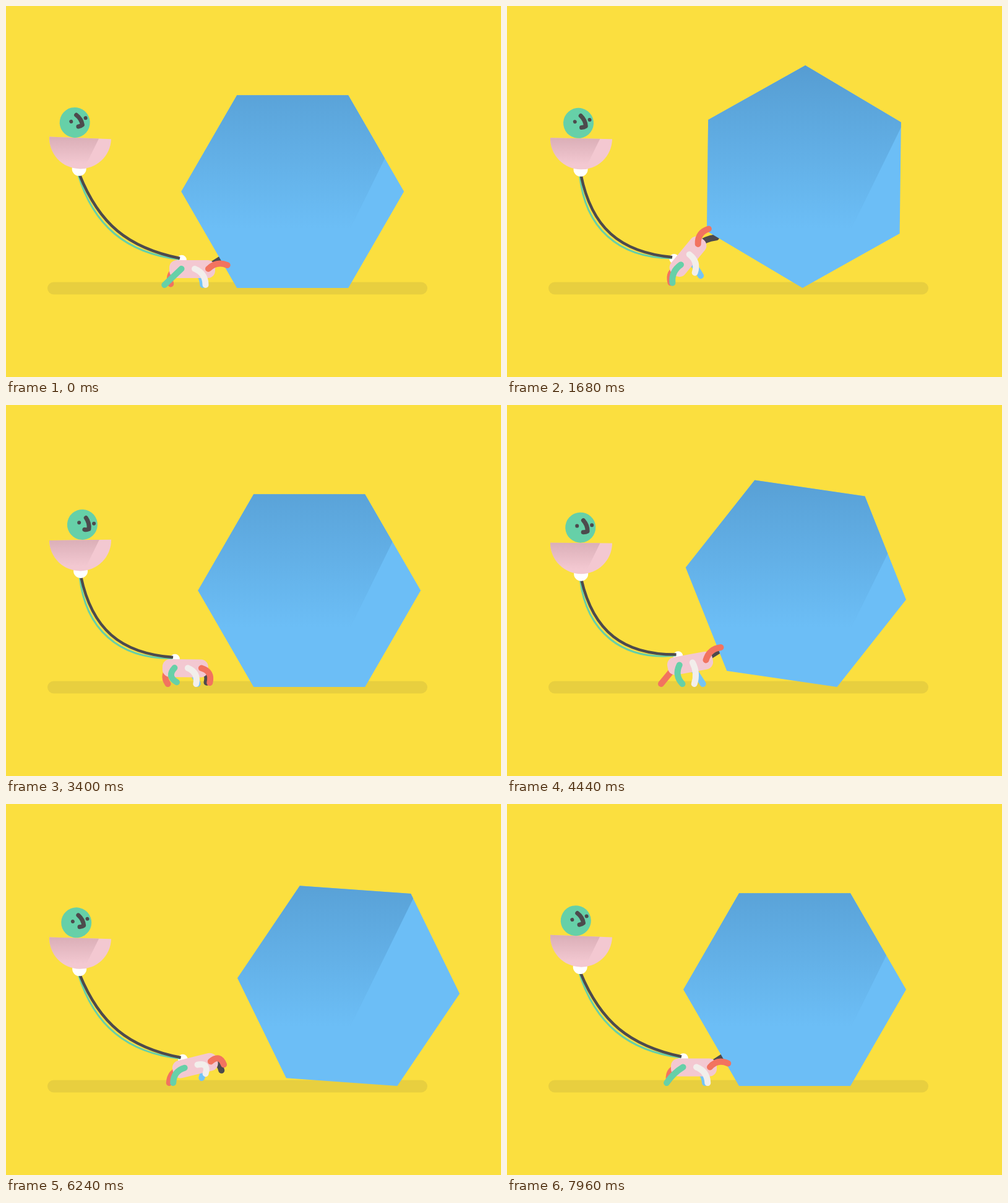
These frames come from a looping animation (800 px wide and 600 px high, 8 s). An HTML page with a canvas:

```html
<!DOCTYPE html>
<html lang="en">
<head>
<meta charset="utf-8">
<title>Rolling hexagon</title>
<style>
  html, body { margin: 0; width: 100%; height: 100%; overflow: hidden; background: #fbdf3f; }
  canvas { display: block; }
</style>
</head>
<body>
<canvas id="stage" width="800" height="600"></canvas>
<script>
const ctx = document.getElementById('stage').getContext('2d');
const CYCLE = 4000, LOOP = 8000, STEP = 40;
const SIDE = 180, GROUND = 456, SOLE = 451;
const DRIFT = SIDE / CYCLE;               // the floor slides one side length per roll
const SHOVE = 14.45, RELEASE = 1600, LAND = 2130;
const SWING = 240, LIMB = 37.6;
const RAD = Math.PI / 180;
const C = {
  bg: '#fbdf3f', floor: '#e8cf3f', hex: '#6cbef6', pink: '#f3c8d1', green: '#66d0a8',
  dark: '#4d4a4d', coral: '#f2735f', white: '#f2eeeb', blue: '#74c4f5'
};

const mix = (a, b, u) => a + (b - a) * u;
const smooth = u => {
  u = Math.min(1, Math.max(0, u));
  return u * u * (3 - 2 * u);
};

function turn(x, y, deg) {
  const c = Math.cos(deg * RAD), s = Math.sin(deg * RAD);
  return [x * c - y * s, x * s + y * c];
}

// Two shoves, a fall, then ever smaller rocking from edge to edge.
function roll(t) {
  if (t < RELEASE) return SHOVE * (smooth(t / 800) + smooth((t - 920) / 680));
  if (t < LAND) return mix(2 * SHOVE, 60, ((t - RELEASE) / (LAND - RELEASE)) ** 1.5);
  let s = t - LAND, span = 480, height = 5.7;
  while (s > span && span > 20) {
    s -= span;
    span *= 0.48;
    height *= -0.42;
  }
  const u = Math.min(1, s / span);
  return 60 + height * 4 * u * (1 - u);
}

function hexPose(t) {
  const angle = roll(t), n = Math.floor(angle / 60), tilt = angle - 60 * n;
  const [dx, dy] = turn(-SIDE / 2, -SIDE * Math.sqrt(3) / 2, tilt);
  return { x: 553.2 + SIDE * n - DRIFT * t + dx, y: GROUND + dy, tilt };
}

// Key poses of the torso: time, x, y, tilt.
const POSES = [
  [0, 301, 425.5, 0], [440, 296, 417.7, -10.5], [920, 283.5, 414, -20], [1600, 291, 404.2, -52],
  [2360, 306, 425.8, -7.5], [2880, 283.5, 425.5, 0], [3960, 302, 426, 0]
];

// Smooth periodic curve through the poses.
function torso(t) {
  const n = POSES.length;
  const pose = i => {
    const lap = Math.floor(i / n), [time, ...rest] = POSES[i - lap * n];
    return [time + lap * CYCLE, ...rest];
  };
  let i = n - 1;
  while (POSES[i][0] > t) i--;
  const [p, a, b, q] = [i - 1, i, i + 1, i + 2].map(pose);
  const h = b[0] - a[0], u = (t - a[0]) / h;
  return [1, 2, 3].map(j => {
    const va = (b[j] - p[j]) / (b[0] - p[0]), vb = (q[j] - a[j]) / (q[0] - a[0]);
    return mix(a[j], b[j], smooth(u)) + h * u * (1 - u) * (va * (1 - u) - vb * u);
  });
}

// Spots are [time, x] on the floor or [time, x, y] in the air.
// A planted foot rides the floor and steps just before its next spot.
function place(spots, t) {
  let i = spots.length - 1;
  while (i >= 0 && spots[i][0] > t) i--;
  const at = k => {
    const lap = Math.floor(k / spots.length), [time, x, y] = spots[k - lap * spots.length];
    return [time + lap * CYCLE, x, y];
  };
  const [ta, xa, ya] = at(i), [tb, xb, yb] = at(i + 1);
  if (ya || yb) {
    const u = smooth((t - ta) / (tb - ta));
    return [mix(xa, xb, u), mix(ya || SOLE, yb || SOLE, u)];
  }
  const u = smooth((t - tb + SWING) / SWING);
  const from = xa + DRIFT * ta, to = xb + DRIFT * tb;
  const lift = Math.min(8, Math.abs(to - from) * 0.2);
  return [mix(from, to, u) - DRIFT * t, SOLE - lift * Math.sin(Math.PI * u)];
}

const leg = (color, hip, side, ...spots) => ({ color, hip, side, end: t => place(spots, t) });

// A hand holds a point of the hexagon that slips as it tips, then walks back to it.
function arm(color, hip, [x0, y0], [x1, y1], slip, ...spots) {
  const grip = t => {
    const { x, y, tilt } = hexPose(t), w = (tilt / (2 * SHOVE)) ** slip;
    const [dx, dy] = turn(mix(x0, x1, w), mix(y0, y1, w), tilt);
    return [x + dx, y + dy];
  };
  const path = [[RELEASE, ...grip(RELEASE - 1)], ...spots, [CYCLE, ...grip(0)]];
  return { color, hip, side: 1, end: t => t < RELEASE ? grip(t) : place(path, t) };
}

const farLimbs = [
  leg(C.coral, -23, -1, [40, 267], [840, 250], [1500, 263.5], [1800, 268], [2200, 265.5], [3300, 266]),
  leg(C.blue, -1, 1, [400, 318.5], [1100, 287], [1600, 313, 436], [2360, 316.5, 443.5],
    [2620, 298.5], [3300, 314], [3950, 320.5]),
  arm(C.dark, 21, [-108, 104], [-76, 152], 1, [2360, 349, 435], [2700, 326], [3450, 326])
];
const nearLimbs = [
  leg(C.green, -17.5, -1, [440, 283.5], [1500, 267.5], [1800, 270], [2200, 272], [3450, 281]),
  leg(C.white, 4, 1, [700, 313], [1100, 295], [1600, 303, 431], [2360, 324, 436.5],
    [2640, 315], [3250, 314], [3800, 331.5]),
  arm(C.coral, 26, [-105.5, 119], [-94, 146], 3, [2360, 354, 426], [2700, 337], [3450, 330])
];

function disc(x, y, r, color) {
  ctx.fillStyle = color;
  ctx.beginPath();
  ctx.arc(x, y, r, 0, 7);
  ctx.fill();
}

function pill(x, y, w, h, r, color) {
  ctx.fillStyle = color;
  ctx.beginPath();
  ctx.roundRect(x, y, w, h, r);
  ctx.fill();
}

function line(color, width, cap = 'round') {
  ctx.strokeStyle = color;
  ctx.lineWidth = width;
  ctx.lineCap = cap;
  ctx.lineJoin = 'round';
  ctx.stroke();
}

// Slanted shade that fades downwards inside the current path.
function shade(left, right, top, bottom, rgb, alpha) {
  const g = ctx.createLinearGradient(0, top, 0, bottom);
  g.addColorStop(0, `rgba(${rgb},${alpha})`);
  g.addColorStop(1, `rgba(${rgb},0)`);
  ctx.save();
  ctx.clip();
  ctx.fillStyle = g;
  ctx.beginPath();
  ctx.moveTo(left, top);
  ctx.lineTo(right, top);
  ctx.lineTo(right - (bottom - top) * 0.49, bottom);
  ctx.lineTo(left, bottom);
  ctx.fill();
  ctx.restore();
}

function drawHexagon(t) {
  const { x, y, tilt } = hexPose(t);
  ctx.beginPath();
  for (let i = 0; i < 6; i++) {
    const [dx, dy] = turn(SIDE, 0, tilt + 60 * i);
    ctx.lineTo(x + dx, y + dy);
  }
  ctx.closePath();
  ctx.fillStyle = C.hex;
  ctx.fill();
  shade(200, 686, 96, 360, '84,154,207', 0.92);
}

function drawLimb({ color, hip, side, end }, t, [bx, by, tilt]) {
  const [hx, hy] = turn(hip, -0.5, tilt), x = bx + hx, y = by + hy;
  const [fx, fy] = end(t), dx = fx - x, dy = fy - y, d = Math.hypot(dx, dy);
  const k = side * Math.sqrt(Math.max(0, LIMB ** 2 - d * d)) / 2 / d;
  ctx.beginPath();
  ctx.moveTo(x, y);
  ctx.quadraticCurveTo((x + fx) / 2 + dy * k, (y + fy) / 2 - dx * k, fx, fy);
  line(color, 10);
}

// Hose that bows out more as its ends come closer.
function drawHose(x0, y0, x1, y1, extra, color, width) {
  const dx = x1 - x0, dy = y1 - y0, d = Math.hypot(dx, dy);
  const bow = (31 + (211 - d) * 0.6 + extra) / 0.75;
  const out = bow / d, along = Math.sqrt(86 ** 2 - bow ** 2) / d;
  ctx.beginPath();
  ctx.moveTo(x0, y0);
  ctx.bezierCurveTo(
    x0 + dx * along - dy * out, y0 + dy * along + dx * out,
    x1 - dx * along - dy * out, y1 - dy * along + dx * out, x1, y1);
  line(color, width, 'butt');
}

function drawHead(t, sway, y) {
  const blink = Math.min(1, Math.max(0.1, Math.abs(t - 960) / 80));
  ctx.save();
  ctx.translate(120.5 + sway * 9.3, y);
  ctx.rotate((sway * 13.2 - 0.5) * RAD);
  disc(0, 0, 24.5, C.green);
  ctx.fillStyle = C.dark;
  for (const x of [-5.4, 18.6]) {
    ctx.beginPath();
    ctx.ellipse(x, -2.9, 3, 3 * blink, 0, 0, 7);
    ctx.fill();
  }
  ctx.beginPath();
  ctx.moveTo(5.2, -11.2);
  ctx.bezierCurveTo(9, -6.5, 11.5, 0, 11, 6.6);
  ctx.quadraticCurveTo(8, 8.2, 4, 7.8);
  line(C.dark, 7);
  ctx.restore();
}

function drawCup(y, tilt) {
  ctx.beginPath();
  ctx.arc(120, y, 50, tilt * RAD, tilt * RAD + Math.PI);
  ctx.closePath();
  ctx.fillStyle = C.pink;
  ctx.fill();
  shade(60, 152, y - 3, y + 42, '216,172,181', 0.95);
}

function draw(time) {
  const t = time % CYCLE;
  const sway = -Math.cos(time * Math.PI / 1000);
  const cupY = 218.4 - 5 * Math.cos(time * Math.PI / 400);
  const cupTilt = -2.1 * sway;
  const body = torso(t), [bx, by, tilt] = body;
  const [kx, ky] = turn(-17, -15, tilt), backX = bx + kx, backY = by + ky;
  const [nx, ny] = turn(0, 50, cupTilt), neckX = 120 + nx, neckY = cupY + ny;

  ctx.fillStyle = C.bg;
  ctx.fillRect(0, 0, 800, 600);
  pill(67, 446.5, 614, 20, 10, C.floor);

  farLimbs.forEach(l => drawLimb(l, t, body));
  drawHexagon(t);

  disc(backX, backY, 7.8, '#fff');
  drawHose(neckX - 1.5, neckY + 9, backX - 4, backY - 1, 6, C.green, 3);
  drawHose(neckX + 0.5, neckY + 9, backX - 3, backY - 2.5, 0, C.dark, 4.5);
  disc(neckX, neckY, 11.5, '#fff');
  drawCup(cupY, cupTilt);
  drawHead(t, sway, cupY - 25);

  ctx.save();
  ctx.translate(bx, by);
  ctx.rotate(tilt * RAD);
  pill(-37, -14.5, 74, 29, 12, C.pink);
  ctx.restore();
  nearLimbs.forEach(l => drawLimb(l, t, body));
}

const start = performance.now();
function tick() {
  const time = (performance.now() - start) % LOOP;
  draw(Math.floor(time / STEP) * STEP);
  requestAnimationFrame(tick);
}
tick();
</script>
</body>
</html>
```
